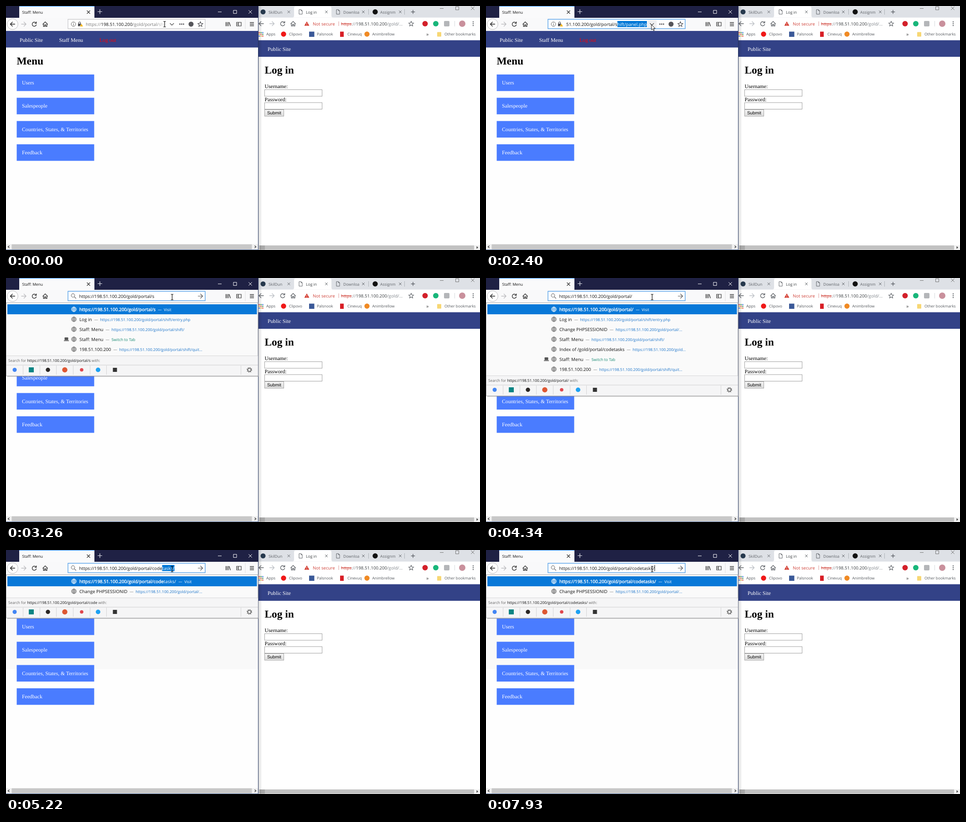
Animation of 1040x538 px, one loop 8000 ms. Source, as an HTML page:

```html
<!DOCTYPE html>
<html lang="en">
<head>
<meta charset="utf-8">
<title>Two browser windows</title>
<style>
  html, body { margin: 0; width: 100%; height: 100%; overflow: hidden; background: #fff; }
  svg { display: block; width: 1040px; height: 538px; font-family: "Open Sans", "Noto Sans", sans-serif; text-rendering: geometricPrecision; }
  text { white-space: pre; }
  .serif { font-family: "Liberation Serif", "Times New Roman", serif; }
  .arial { font-family: "Liberation Sans", Arial, sans-serif; }
  .bold { stroke: #fff; stroke-width: .4px; }
</style>
</head>
<body>
<svg id="stage" viewBox="0 0 1040 538">
  <defs>
    <linearGradient id="shade"><stop offset="0" stop-opacity=".14"/><stop offset="1" stop-opacity="0"/></linearGradient>
    <linearGradient id="button" x2="0" y2="1"><stop offset="0" stop-color="#f6f6f6"/><stop offset="1" stop-color="#dcdcdc"/></linearGradient>
    <linearGradient id="fade" gradientUnits="userSpaceOnUse" x1="328" x2="352"><stop offset="0" stop-color="#777"/><stop offset="1" stop-color="#777" stop-opacity="0"/></linearGradient>
    <clipPath id="field"><rect x="175" y="30" width="178.5" height="19"/></clipPath>
  </defs>
  <g id="page"></g>
  <g id="chrome"></g>
  <g id="live"></g>
  <text id="ruler" visibility="hidden"></text>
</svg>
<script>
const LOOP = 8000;
const HOST = '198.51.100.200';
const BASE = `https://${HOST}/gold/portal/`;
const FULL = BASE + 'shift/panel.php';
const WORD = 'codetasks/';
const URL_SIZE = 9.77;
const BLUE = '#0078d7', INK = '#4a4a4f', NAVY = '#334287';

const $ = id => document.getElementById(id);
const rect = (x, y, w, h, fill, extra = '') =>
  `<rect x="${x}" y="${y}" width="${w}" height="${h}" fill="${fill}" ${extra}/>`;
const disc = (x, y, r, fill, extra = '') => `<circle cx="${x}" cy="${y}" r="${r}" fill="${fill}" ${extra}/>`;
const ring = (x, y, r, color, w = 1) => disc(x, y, r, 'none', `stroke="${color}" stroke-width="${w}"`);
const path = (x, y, d, color = INK, w = 1.2, fill = 'none') =>
  `<path transform="translate(${x} ${y})" d="${d}" stroke="${color}" stroke-width="${w}" fill="${fill}"/>`;
const text = (x, y, str, size, fill = '#111', extra = '') =>
  `<text x="${x}" y="${y}" font-size="${size}" fill="${fill}" ${extra}>${str}</text>`;
const serif = (x, y, str, size = 11.7, fill = '#000', extra = '') =>
  text(x, y, str, size, fill, `class="serif" ${extra}`);
const span = (str, fill, extra = '') => `<tspan fill="${fill}" ${extra}>${str}</tspan>`;

const CROSS = r => `M${-r}${-r}L${r} ${r}M${r} ${-r}L${-r} ${r}`;
const PLUS = 'M-5 0H5M0-5V5';
const BACK = 'M5.5 0H-5M0-5L-5 0 0 5';
const FORWARD = 'M-5.5 0H5M0-5L5 0 0 5';
const RELOAD = 'M3.6-2.8A4.6 4.6 0 1 0 4.6 1M4.6-5.5V-1.6H.8';
const HOME = 'M-5.5.5L0-5 5.5.5M-3.8-.5V5H-1.2V1.5H1.2V5H3.8V-.5';
const STAR = 'M0-5.3L1.6-1.7 5.4-1.3 2.5 1.2 3.4 5 0 3 -3.4 5 -2.5 1.2 -5.4-1.3 -1.6-1.7Z';
const DOC = 'M-3.5-5H1L3.5-2.5V5H-3.5ZM1-5V-2.5H3.5';
const BARS = 'M-4.5-3.5H4.5M-4.5 0H4.5M-4.5 3.5H4.5';
const CHEVRON = 'M-4.3-2L0 2.3 4.3-2';
const BEAM = 'M-2.7-6H-.7L0-5.4 .7-6H2.7M0-5.4V5.4M-2.7 6H-.7L0 5.4 .7 6H2.7';
const ARROW = 'M0 0V11.6L2.7 9.2 4.6 13.4 6.4 12.6 4.6 8.5H8.3Z';

function width(str, size) {
  const r = $('ruler');
  r.setAttribute('font-size', size);
  r.textContent = str;
  return r.getComputedTextLength();
}

// Page in the left window
function leftPage(stale) {
  const items = ['Users', 'Salespeople', 'Countries, States, &amp; Territories', 'Feedback'];
  return rect(0, 55, 553, 483, '#fefefe')
    + (stale ? rect(0, 150, 553, 112.5, '#f9f9f9') : '')
    + rect(0, 55, 553, 36.5, NAVY)
    + serif(30, 78.5, 'Public Site', 11.7, '#fff')
    + serif(116.5, 78.5, 'Staff Menu', 11.7, '#fff')
    + serif(205, 78.5, 'Log out', 11.7, '#f00')
    + serif(23.5, 129.3, 'Menu', 23.4, '#000', 'font-weight="bold"')
    + items.map((s, i) => {
        const y = 151 + 51.3 * i;
        return rect(23.5, y, 170, 36.5, '#4a7cff') + serif(35, y + 22, s, 11.7, '#fff');
      }).join('')
    + rect(0, 525, 553, 12.5, '#f0f0f0') + rect(12.5, 525.5, 527, 11, '#c8c8c8')
    + path(6, 531, 'M1.5-2.5L-1.5 0 1.5 2.5', '#333', 1.3)
    + path(547, 531, 'M-1.5-2.5L1.5 0-1.5 2.5', '#333', 1.3);
}

function leftFrame() {
  return rect(0, 0, 554, 26, '#1f2144') + rect(29, 0, 165, 26, '#fafafb') + rect(29, 0, 165, 1, '#0a84ff')
    + text(35.5, 17, 'Staff: Menu', 8.5)
    + path(181, 13.5, CROSS(3.5), '#333') + path(206, 12.5, PLUS, '#e8e8f0')
    + path(469, 13, 'M-4 0H4', '#fff', 1) + path(502.5, 13, 'M-3.5-3.5H3.5V3.5H-3.5Z', '#fff', 1)
    + path(536, 13, CROSS(3.7), '#fff', 1)
    + rect(0, 26, 554, 29, '#f9f9fa')
    + disc(14.5, 40, 11.8, '#fff', 'stroke="#b5b5b8" stroke-width=".9"')
    + path(14.5, 40, BACK, '#222', 1.4) + path(39, 40, FORWARD, '#bcbcbf', 1.4)
    + path(62, 40, RELOAD, '#333', 1.4) + path(86, 40, HOME, '#333', 1.4)
    + path(487, 40, 'M-4.5-4.5V4.5M-1.8-4.5V4.5M1-4.5V4.5M2.6-4.3L5.5 4.5', '#333', 1.3)
    + path(511, 40, 'M-5-4H5V4H-5ZM-.8-4V4M-3.6-1.5H-2M-3.6.8H-2', '#333')
    + path(525, 40, 'M0-11V11', '#dedee0', 1)
    + path(539.5, 40, BARS, '#333', 1.3)
    + rect(553, 0, 1, 538, '#26355f') + rect(0, 537, 554, 1, '#4d6a9c');
}

function chromeTab(x, title, close, fill = '#5f6368') {
  return text(x, 16.5, title, 8.6, fill) + path(close, 13, CROSS(2.8), '#5f6368', 1);
}

function rightWindow() {
  const grid = [0, 1, 2, 3, 4, 5, 6, 7, 8].map(i =>
    rect(554.5 + i % 3 * 3.8, 57.5 + (i / 3 | 0) * 3.8, 2.5, 2.5, ['#e2574c', '#4a9b57', '#4a7fe0', '#e9b43c'][i % 4])).join('');
  const mark = (x, name, tx) => text(tx, 65.3, name, 8.4, '#54585d');
  return rect(554, 0, 486, 538, '#fff') + rect(554, 0, 486, 25.5, '#dee1e6')
    + path(632, 0, 'M-4 25.5Q0 25.5 0 21V5Q0 1 4 1H78Q82 1 82 5V21Q82 25.5 86 25.5Z', 'none', 0, '#fff')
    + disc(564, 13, 5.5, '#26394d') + chromeTab(576, 'SkilDun', 620.5)
    + path(646.5, 13, DOC, '#5f6368', 1) + chromeTab(658, 'Log in', 703, '#3c4043')
    + path(728.5, 13, DOC, '#5f6368', 1) + chromeTab(740, 'Downloa', 784)
    + path(795.5, 13, 'M0-6V6M79 -6V6', '#a3a7ac', .8)
    + disc(810, 13, 5.7, '#111') + chromeTab(821, 'Assignm', 865)
    + path(893, 13, 'M-4.3 0H4.3M0-4.3V4.3', '#5f6368', 1.4)
    + path(956, 5, 'M-4 .5H4', '#777', 1) + path(990, 5, 'M-3.5-3.5H3.5V3.5H-3.5Z', '#777', 1)
    + path(1024, 5, CROSS(3.7), '#777', 1)
    + path(560, 39, BACK, '#5f6368', 1.4) + path(583.5, 39, FORWARD, '#bdc1c6', 1.4)
    + path(607, 39, RELOAD, '#5f6368', 1.4) + path(630, 39, HOME, '#5f6368', 1.4)
    + path(660, 39, 'M0-5L5.5 4.5H-5.5Z', 'none', 0, '#d33b2f') + path(660, 39, 'M0-1.5V1.5M0 2.3V3.4', '#fff', 1)
    + text(673, 42.7, 'Not secure', 9.65, '#d0433a') + rect(729.5, 34, 1, 10, '#d99')
    + text(735, 42.7, span('https', '#d0433a', 'text-decoration="line-through"') + span('://', '#80868b')
        + span(HOST, '#3c4043') + span('/gold/...', '#80868b'), 9.65)
    + path(889, 39, STAR, '#5f6368', 1.1)
    + disc(919.5, 39, 6, '#d3202a') + disc(943, 39, 6, '#18b67a') + rect(961, 33, 12, 12, '#b4b6b9', 'rx="2"')
    + rect(984, 33, 1, 12, '#d5d8dc') + disc(1001, 39, 7, '#c9909c')
    + [-4, 0, 4].map(d => disc(1025, 39 + d, 1.2, '#5f6368')).join('')
    + grid + text(571, 65.3, 'Apps', 8.6, '#54585d')
    + disc(609, 62, 5.7, '#f01818') + mark(0, 'Clipovo', 621)
    + rect(665, 56.5, 11.5, 11.5, '#3b5998') + mark(0, 'Palsnook', 682)
    + rect(733, 56.5, 8, 11.5, '#d81f26') + mark(0, 'Cinevuq', 749)
    + disc(792, 62, 5.7, '#f08a24') + mark(0, 'Animbrellow', 803.5)
    + text(922, 65.5, '»', 11, '#444') + rect(946, 57.5, 9, 10, '#f7d774', 'rx="1"')
    + text(962, 65.3, 'Other bookmarks', 8.35, '#54585d')
    + rect(554, 75.5, 486, 36.5, NAVY) + serif(574, 98.5, 'Public Site', 11.7, '#fff')
    + serif(567.5, 149.3, 'Log in', 23.4, '#000', 'font-weight="bold"')
    + serif(567.5, 181, 'Username:') + serif(567.5, 209.5, 'Password:')
    + [184.5, 213].map(y => rect(567.5, y, 126, 14.5, '#fff', 'stroke="#a0a0a0"')).join('')
    + rect(567.5, 228.5, 42, 14.5, 'url(#button)', 'stroke="#a3a3a3"')
    + text(573, 239.3, 'Submit', 9.9, '#000', 'class="arial"')
    + rect(554, 527.5, 486, 10.5, '#f1f1f1') + rect(556, 528, 471, 9.5, '#c1c1c1') + rect(556, 528, 12, 9.5, '#a8a8a8')
    + path(1034, 532.5, 'M-1.5-3L2 0-1.5 3Z', 'none', 0, '#444')
    + rect(554, 0, 8, 538, 'url(#shade)');
}

// Address field of the left window
function addressBar(s) {
  const typing = s.typed !== undefined;
  const x = typing ? 160.5 : 175 - (s.scroll || 0);
  const url = typing ? s.typed + (s.rest || '') : FULL;
  const [a, b] = typing ? [s.typed.length, url.length] : s.sel || [0, 0];
  const xa = x + width(url.slice(0, a), URL_SIZE), xb = x + width(url.slice(0, b), URL_SIZE);
  let out = rect(136, 29.3, 301, 20.7, '#fff', `stroke="${s.idle ? '#b8b8bb' : '#4a9be8'}" stroke-width="${s.idle ? 1 : 1.3}"`);

  if (typing) {
    out += ring(147, 38.5, 3.8, '#777', 1.2) + path(150, 41.5, 'M0 0L3.8 3.8', '#777', 1.5)
      + path(426.5, 40, FORWARD, '#555', 1.2);
  } else {
    if (s.hover) out += rect(354, 31, 20.5, 18, '#f0f0f1');
    out += ring(148, 40, 4.9, '#666', 1) + path(148, 40, 'M0-2.7V-1.5M0-.5V2.8', '#555', 1.1)
      + path(161.5, 40, 'M-2-1V-3A2 2 0 0 1 2-3V-1', INK, 1.2) + rect(158, 39, 7, 5.5, INK)
      + path(165.5, 42.5, 'M0-3.8L3.8 2.8H-3.8Z', '#fff', .6, '#f5b400')
      + path(364, 40, CHEVRON, '#555', 1.3)
      + [-4, 0, 4].map(d => disc(385.5 + d, 40, 1.4, INK)).join('')
      + disc(406, 40, 5.5, '#55555a') + path(426.5, 40, STAR, INK, 1.2);
  }
  const parts = s.idle
    ? span('https://', '#777') + span(HOST, '#111') + span(BASE.slice(8 + HOST.length) + 'shift/', 'url(#fade)')
    : span(url.slice(0, a), '#111') + span(url.slice(a, b), '#fff') + span(url.slice(b), '#111');
  out += `<g ${typing ? '' : 'clip-path="url(#field)"'}>`
    + (b > a ? rect(xa, 33, xb - xa, 13.5, BLUE) : '')
    + text(x, 43.8, parts, URL_SIZE) + '</g>';
  return out + (s.caret ? rect(xb, 33, 1, 13.5, '#000') : '');
}

function globe(y, color) {
  return ring(149, y, 5.2, color, 1)
    + path(149, y, 'M-5 0H5M0-5V5M-4.3-2.7H4.3M-4.3 2.7H4.3M0-5.2Q-5 0 0 5.2M0-5.2Q5 0 0 5.2', color, .8);
}

const LINK = '#1a73c9';
const LOGIN = ['Log in', BASE + 'shift/entry.php'];
const SESSION = ['Change PHPSESSIONID', BASE + '...'];
const MENU = ['Staff: Menu', BASE + 'shift/'];
const INDEX = ['Index of /gold/portal/codetasks', `https://${HOST}/gold...`];
const SWITCH = ['Staff: Menu', 'Switch to Tab', true];
const QUIT = [HOST, BASE + 'shift/quit...'];
const WIDE = [LOGIN, SESSION, MENU, INDEX, SWITCH, QUIT];
const STALE = [SESSION, ...WIDE.slice(1)];

function panel({ typed, rest = '', rows }) {
  const foot = 83 + 22 * rows.length;
  const tail = (str, ink, dash) => span('—', dash, 'dx="5" font-size="8.5"') + span(str, ink, 'dx="4.5" font-size="8.5"');
  let out = rect(3, foot + 44, 551, 2.5, '#777', 'opacity=".55"')
    + rect(.5, 54.5, 552.5, foot - 9.5, '#fafafa', 'stroke="#a9a9ab"')
    + rect(3, 58, 547.5, 22, '#0878d8') + globe(69, '#fff')
    + text(161, 73.3, span(typed, '#fff', 'class="bold"') + span(rest, '#fff') + tail('Visit', '#fff', '#fff'), 9.92);
  rows.forEach(([title, sub, tab], i) => {
    const y = 91 + 22 * i;
    out += globe(y, '#666') + text(161, y + 4.4, span(title, '#111') + tail(sub, tab ? '#12876f' : LINK, '#777'), 9.8);
    if (tab) out += rect(128.5, y - 4, 8, 6, '#555', 'rx="1"') + rect(127, y + 2.5, 11, 1.6, '#555');
  });
  const y = foot + 31.5;
  out += rect(1, foot, 552, 44, '#f5f5f6') + rect(1, foot, 552, 1, '#d6d6d8') + rect(1, foot + 20.5, 552, 1, '#d0d0d2')
    + text(5, foot + 13.5, span('Search for ', '#666') + span(typed, '#111') + span(' with:', '#666'), 8.25)
    + disc(19, y, 4.5, '#4285f4') + rect(50, y - 5.5, 11, 11, '#0c8484') + disc(92, y, 4.7, '#2b2724')
    + disc(129, y, 5.7, '#de5833') + disc(166, y, 3.8, '#e0474f') + disc(202, y, 5, '#1da1f2') + rect(234.5, y - 4.5, 9, 9, '#333');
  for (const x of [37, 74, 110, 147, 184, 220, 515]) out += rect(x, foot + 22, 1, 20, '#d4d4d6');
  return out + ring(534, y, 3.4, '#555', 1.3)
    + disc(534, y, 5, 'none', 'stroke="#555" stroke-width="1.8" stroke-dasharray="1.7 2.23"');
}

// Timeline: every entry changes part of the current state
const START = BASE.length + 1;
const type = n => ({ typed: BASE + WORD.slice(0, n), rest: WORD.slice(n) });
const steps = [
  [0, { idle: true, beam: [348, 40] }],
  [140, { idle: false, sel: [0, FULL.length] }],
  [270, { beam: [344, 40] }],
  [390, { beam: [342, 40] }],
  [540, { beam: [341, 40] }],
  [1070, { sel: null }],
  [1190, { beam: [340, 40] }],
  [1550, { sel: [START, START + 1], beam: [346, 40] }],
  [1700, { sel: [START, FULL.length], beam: [361, 40] }],
  [1820, { scrolled: true, beam: [354, 40] }],
  [1970, { beam: [353, 41] }],
  [2120, { beam: [350, 42] }],
  [2400, { beam: null, arrow: [363, 41], hover: true }],
  [2960, { tip: true }],
  [3110, { typed: BASE + 's', arrow: null, beam: [364.5, 42] }],
  [3260, { tip: false, rows: [LOGIN, MENU, SWITCH, QUIT] }],
  [3760, { typed: BASE, rows: WIDE.slice(0, 5) }],
  [3910, { rows: WIDE }],
  [4460, { ...type(1), rows: STALE }],
  [4580, type(2)],
  [4730, type(3)],
  [4850, type(4)],
  [5220, { rows: [SESSION], stale: true }],
  [6250, type(5)],
  [6550, type(6)],
  [6670, type(7)],
  [6820, type(8)],
  [6970, type(9)],
  [7240, type(10)],
  [7930, { caret: true }]
];
let sum = {};
const states = steps.map(([, change]) => (sum = { ...sum, ...change }));

function draw(s) {
  const scroll = s.scrolled ? 175 + width(FULL, URL_SIZE) - 353 : 0;
  $('page').innerHTML = leftPage(s.stale);
  $('live').innerHTML = addressBar({ ...s, scroll })
    + (s.rows ? panel(s) : '')
    + (s.tip ? rect(363.5, 56.5, 59, 16, '#fff', 'stroke="#888"') + text(367.5, 67.5, 'Show history', 8.3, '#555') : '')
    + (s.beam ? path(...s.beam, BEAM, '#000', 1.1) : '')
    + (s.arrow ? path(...s.arrow, ARROW, '#000', .9, '#fff') : '');
}

$('chrome').innerHTML = leftFrame() + rightWindow();
const begin = performance.now();
let shown = -1;
function tick() {
  const t = (performance.now() - begin) % LOOP;
  let i = steps.length - 1;
  while (steps[i][0] > t) i--;
  if (i !== shown) draw(states[shown = i]);
  requestAnimationFrame(tick);
}
tick();
</script>
</body>
</html>
```
